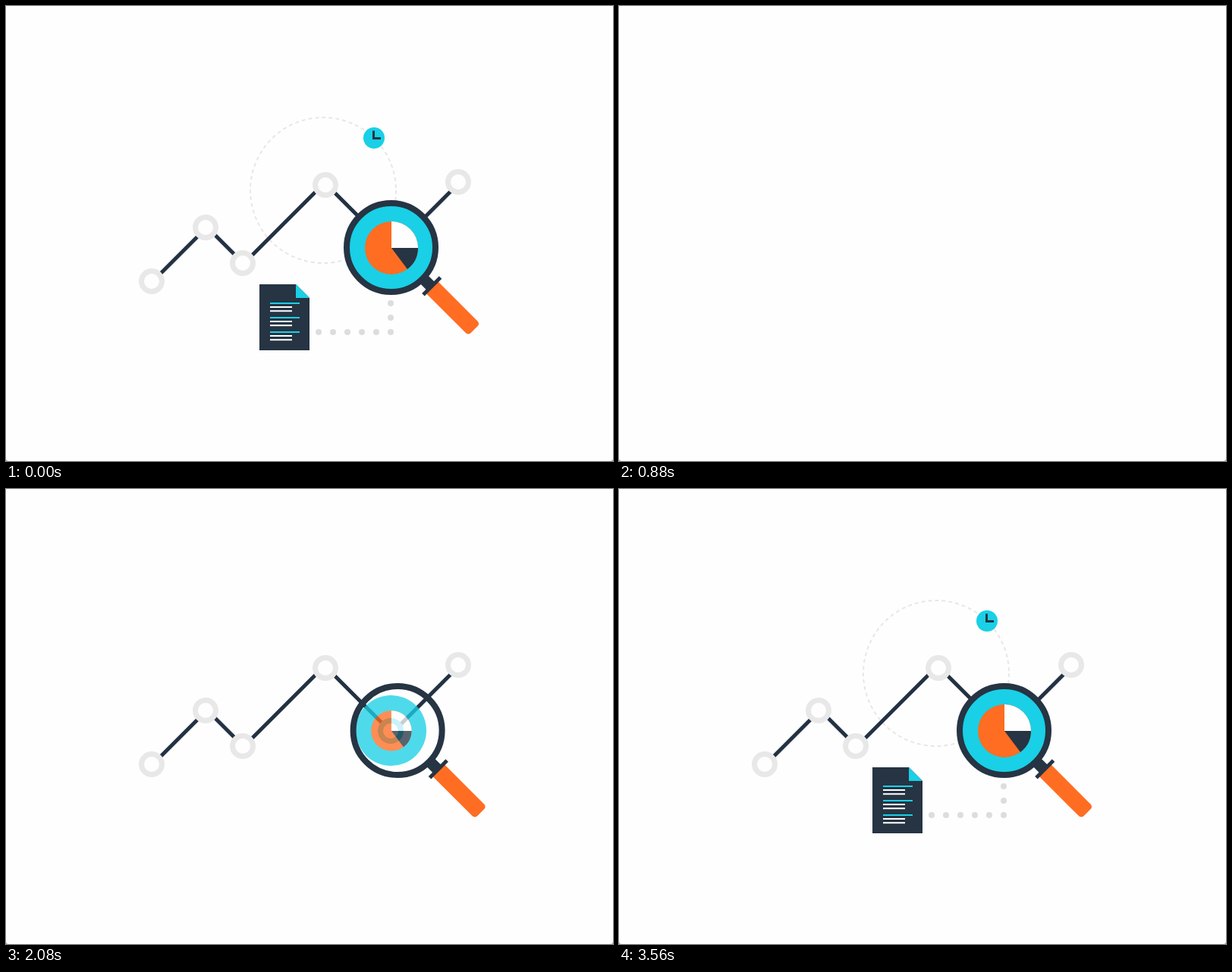
An HTML page that plays this animation: 800x600 px, repeating every 3580 ms.

```html
<!DOCTYPE html>
<html lang="en">
<head>
<meta charset="utf-8">
<title>Chart analysis</title>
<style>
  html, body { margin: 0; width: 100%; height: 100%; overflow: hidden; background: #fefefe; }
  svg { display: block; width: 800px; height: 600px; }
  .dark { fill: #263443; }
  .cyan { fill: #19d0e6; }
  .orange { fill: #ff6d22; }
  .white { fill: #fefefe; }
</style>
</head>
<body>
<svg viewBox="0 0 800 600">
  <defs>
    <clipPath id="wipe"><rect id="edge" x="170" y="200" width="450" height="200"/></clipPath>
  </defs>

  <g id="orbit">
    <circle cx="418" cy="243" r="96" fill="none" stroke="#e8e7e7" stroke-width="2" stroke-dasharray="5 4"/>
    <circle class="cyan" cx="485" cy="174" r="14"/>
    <path d="M484.5 164.5V174.5H494" fill="none" stroke="#263443" stroke-width="3"/>
  </g>

  <g id="dots" fill="#dedddd"></g>

  <g clip-path="url(#wipe)">
    <path d="M203 353.5l51-51M273 299.5l30 30M322 331l88-88M431 244l67 67M518 312.5l70-70"
      stroke="#233143" stroke-width="5"/>
    <g id="nodes" fill="#fefefe" stroke-width="7"></g>
  </g>

  <g id="pie">
    <circle class="cyan" r="61"/>
    <g transform="translate(.5 .5)">
      <circle class="orange" r="35"/>
      <path class="white" d="M0 0V-35A35 35 0 0 1 35 0Z"/>
      <path class="dark" d="M0 0H35A35 35 0 0 1 21 28Z"/>
    </g>
  </g>

  <g id="lens">
    <circle r="58.5" fill="none" stroke="#263443" stroke-width="8"/>
    <g transform="rotate(45)">
      <rect class="orange" x="72" y="-12" width="82" height="22" rx="4.5"/>
      <rect class="dark" x="60" y="-8.5" width="14" height="15"/>
      <rect class="dark" x="71.5" y="-18" width="5" height="32"/>
    </g>
  </g>

  <g id="doc">
    <path class="dark" d="M-33-43.5H15L33-25.5V43.5H-33Z"/>
    <path class="cyan" d="M15-43.5L33-25.5H15Z"/>
    <g id="rows"></g>
  </g>

  <path d="M0 596Q0 600 4 600H0ZM800 596Q800 600 796 600H800Z" fill="#b9b9b9"/>
</svg>
<script>
const LOOP = 3580, LEAVE = 15, EXIT = 810;
const LEFT = 174, RIGHT = 613, SLIDE = 472;
const $ = id => document.getElementById(id);

function add(parent, tag, attrs) {
  const el = document.createElementNS('http://www.w3.org/2000/svg', tag);
  for (const k in attrs) el.setAttribute(k, attrs[k]);
  return parent.appendChild(el);
}

const points = [[192, 363], [263, 292], [312, 339], [421, 236], [507, 319], [596, 232]];
points.forEach(([cx, cy], i) =>
  add($('nodes'), 'circle', { cx, cy, r: 13.5, stroke: i === 4 ? '#19d0e6' : '#e9e8e8' }));

// The trail runs down from the lens, then left to the document.
const dots = Array.from({ length: 8 }, (_, i) => add($('dots'), 'circle', {
  cx: 507 - 19 * Math.max(0, i - 2), cy: 392 + 19 * Math.min(i, 2), r: 4
}));

for (let i = 0; i < 3; i++) {
  const y = -19.5 + 19 * i;
  add($('rows'), 'rect', { class: 'cyan', x: -19, y, width: 39, height: 2 });
  for (const dy of [5, 10.2])
    add($('rows'), 'rect', { class: 'white', x: -19, y: y + dy, width: 29, height: 2 });
}

const clamp = u => Math.min(1, Math.max(0, u));
const sineOut = u => Math.sin(u * Math.PI / 2);
const cubicOut = u => 1 - (1 - u) ** 3;
const quartOut = u => 1 - (1 - u) ** 4;
const quartInOut = u => u < .5 ? 8 * u ** 4 : 1 - 8 * (1 - u) ** 4;

// 1 while shown: everything leaves together, then returns at its own time.
function shown(t, start, length, ease) {
  return t < start
    ? 1 - sineOut(clamp((t - LEAVE) / EXIT))
    : ease(clamp((t - start) / length));
}

function pop(el, x, y, k) {
  el.setAttribute('transform', `translate(${x} ${y}) scale(${k})`);
  el.setAttribute('opacity', k);
}

function draw(t) {
  const wipe = shown(t, 800, 815, quartInOut);
  $('edge').setAttribute('width', LEFT + (RIGHT - LEFT) * wipe - 170);

  const away = 1 - shown(t, 1575, 800, quartOut);
  $('lens').setAttribute('transform', `translate(${507.5 + SLIDE * away} 318.5)`);
  pop($('pie'), 507.5, 318.5, shown(t, 1960, 400, quartOut));
  $('orbit').setAttribute('opacity', shown(t, 2370, 400, cubicOut));
  dots.forEach((dot, i) =>
    dot.setAttribute('opacity', shown(t, 2740 + i * 30, 250, quartOut)));
  pop($('doc'), 367, 410.5, shown(t, 3260, 300, cubicOut));
}

const begin = performance.now();
function tick() {
  draw((performance.now() - begin) % LOOP);
  requestAnimationFrame(tick);
}
draw(0);
requestAnimationFrame(tick);
</script>
</body>
</html>
```
